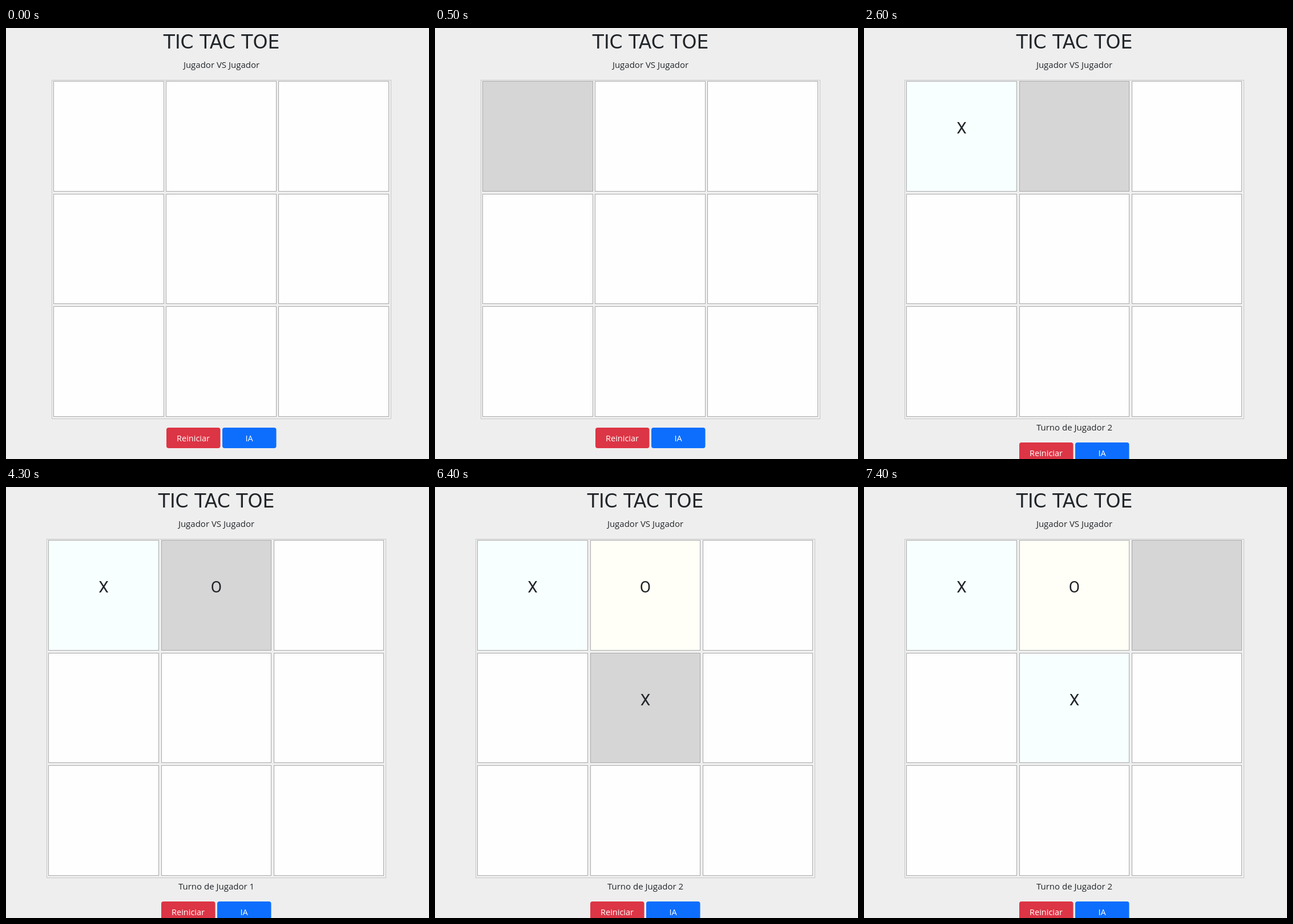
Write an HTML page that moves like this. It is 741x756 px and loops after 8 s.

```html
<!DOCTYPE html>
<html lang="es">
<head>
<meta charset="utf-8">
<title>Tic Tac Toe</title>
<style>
  html, body { margin: 0; width: 100%; height: 100%; overflow: hidden; background: #eee; }
  svg { display: block; }
  text { font: 15px "Open Sans", sans-serif; fill: #212529; text-anchor: middle; }
  .title { font: 33px "DejaVu Sans", sans-serif; }
  .mark { font: 28px Roboto, sans-serif; }
  .label { font-size: 14.5px; fill: #fff; }
</style>
</head>
<body>
<svg id="stage" width="741" height="756"></svg>
<script>
const LOOP = 8000;
const stage = document.getElementById('stage');

// Moves: [time, cell, mark]; hovers: [time, cell under the pointer]
const moves = [[1500, 0, 'X'], [4300, 1, 'O'], [6400, 4, 'X']];
const hovers = [[0, -1], [400, 1], [500, 0], [2600, 1], [5200, 4], [7300, 5], [7400, 2]];
const tints = { X: '#f7ffff', O: '#fffff7' };

// Edges of columns and rows as [start, size]
const wideCols = [[83, 194], [280, 194], [477, 194]];
const scrollCols = [[74, 194], [272, 193], [469, 193]];
const rows = [[93, 194], [291, 193], [488, 194]];

const text = (x, y, str, cls = '') => `<text x="${x}" y="${y}" class="${cls}">${str}</text>`;

const box = (x, y, w, h, fill, stroke) =>
  `<rect x="${x + .5}" y="${y + .5}" width="${w - 1}" height="${h - 1}" fill="${fill}" stroke="${stroke}"/>`;

const button = (x, y, str, fill) =>
  `<rect x="${x}" y="${y}" width="94.5" height="36" rx="4" fill="${fill}"/>` +
  text(x + 47, y + 23.5, str, 'label');

function draw(played, hover) {
  const started = played.length > 0;
  const dx = started ? -9 : 0; // the scrollbar narrows the page
  const mid = 377.5 + dx;
  const cols = started ? scrollCols : wideCols;
  const marks = Object.fromEntries(played.map(([, cell, mark]) => [cell, mark]));

  let out = text(mid, 36, 'TIC TAC TOE', 'title') + text(mid, 70, 'Jugador VS Jugador');
  out += box(80 + dx, 91, 595, 595, '#efefef', '#c8c8c8');
  for (let i = 0; i < 9; i++) {
    const [x, w] = cols[i % 3], [y, h] = rows[Math.floor(i / 3)];
    const mark = marks[i];
    out += box(x, y, w, h, i === hover ? '#d6d6d6' : tints[mark] || '#fefefe', '#a9a9a9');
    if (mark) out += text(x + w / 2, y + 91.5, mark, 'mark');
  }
  if (started) out += text(mid, 706, `Turno de Jugador ${played.length % 2 + 1}`);

  const top = started ? 727 : 701;
  out += button(281 + dx, top, 'Reiniciar', '#dc3545') + button(379 + dx, top, 'IA', '#0d6efd');
  stage.innerHTML = out;
}

let shown;
function tick() {
  const t = performance.now() % LOOP;
  const played = moves.filter(([at]) => at <= t);
  const hover = hovers.filter(([at]) => at <= t).pop()[1];
  const key = `${played.length}/${hover}`;
  if (key !== shown) draw(played, hover);
  shown = key;
  requestAnimationFrame(tick);
}
tick();
</script>
</body>
</html>
```
